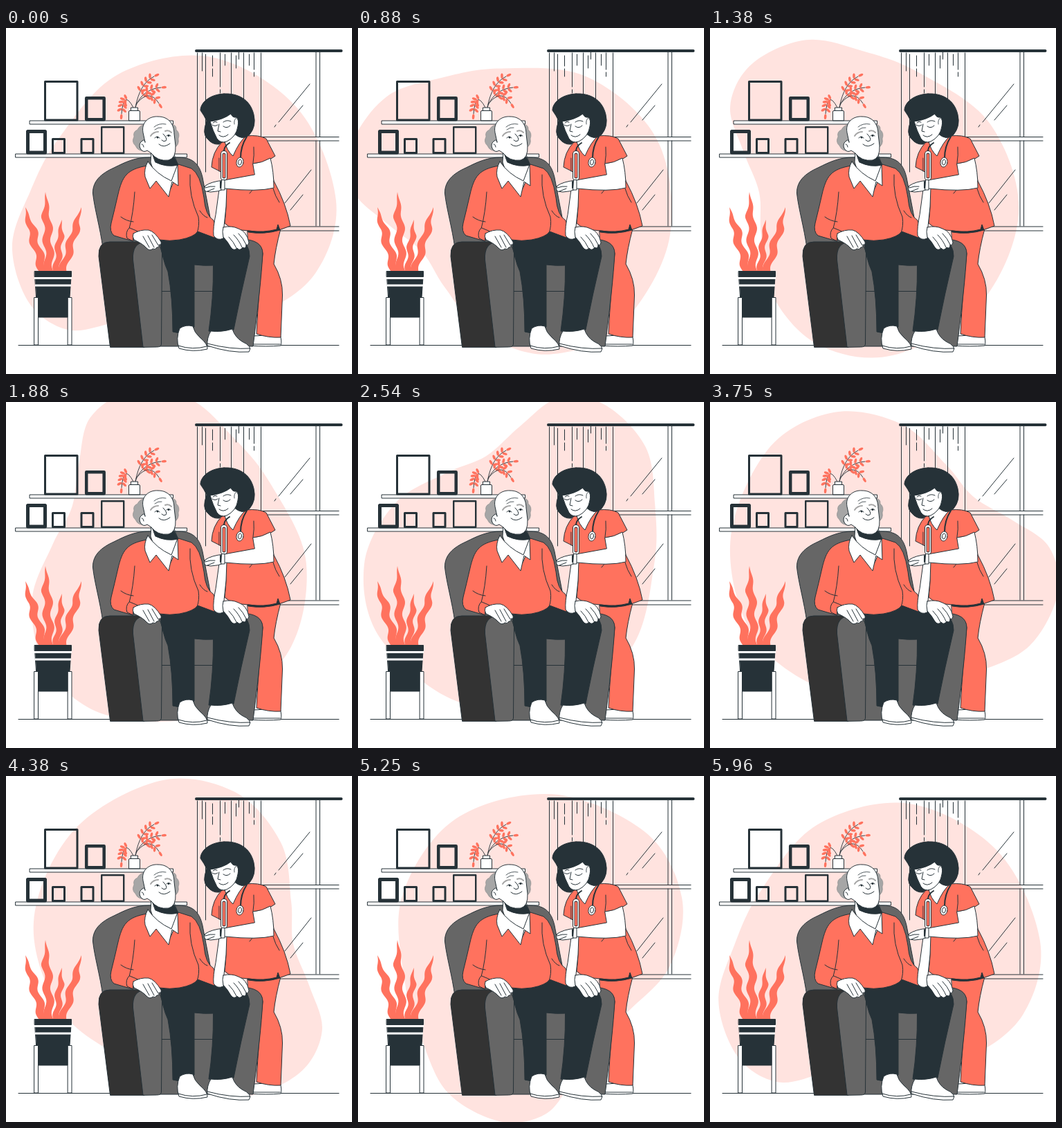
These frames come from a looping animation (500x500 px, 6000 ms). An HTML page with a canvas:

```html
<!DOCTYPE html>
<html lang="en">
<head>
<meta charset="utf-8">
<title>Home care</title>
<style>
html, body { margin: 0; width: 100%; height: 100%; overflow: hidden; background: #fff; }
canvas { display: block; width: 100vw; height: 100vh; }
</style>
</head>
<body>
<canvas id="stage" width="500" height="500"></canvas>
<script>
const INK = '#263238', CORAL = '#ff725e', PALE = '#ffe3df', GRAY = '#666', SIDE = '#333', HAIR = '#a6a6a6';
const LOOP = 6000, TURN = Math.PI * 2;

const stage = document.getElementById('stage').getContext('2d');
const scene = document.createElement('canvas');
scene.width = scene.height = 500;
const g = scene.getContext('2d');
g.lineCap = g.lineJoin = 'round';

function shape(d, fill, stroke = INK, width = 1) {
  const p = new Path2D(d);
  if (fill) { g.fillStyle = fill; g.fill(p); }
  if (stroke) { g.strokeStyle = stroke; g.lineWidth = width; g.stroke(p); }
}
const line = (d, width = 1, color = INK) => shape(d, null, color, width);

function box(x, y, w, h, fill = '#fff', width = 1) {
  shape(`M${x},${y}h${w}v${h}h${-w}z`, fill, INK, width);
}

function oval(x, y, rx, ry, turn, fill, stroke) {
  g.beginPath();
  g.ellipse(x, y, rx, ry, turn, 0, TURN);
  if (fill) { g.fillStyle = fill; g.fill(); }
  if (stroke) { g.strokeStyle = stroke; g.lineWidth = 1; g.stroke(); }
}

function drawWindow() {
  line('M276.5,36V200M288.5,38V208M309.5,36V85M309.5,89V94M325.5,36V98M343.5,36V104M368.5,36V157');
  line('M283.5,36V62M298.5,40V55M298.5,59V70M316.5,38V54M332.5,40V58M336.5,33V45M351.5,38V54M358.5,36V60M358.5,64V70');
  for (const x of [448, 453.5]) line(`M${x},35V157.5M${x},163V286`);
  for (const y of [157.5, 163]) line(`M369,${y}H481`);
  for (const y of [287, 293]) line(`M394,${y}H481`);
  line('M439,81L394,136M390,140L388,143M429,112L411,133M441,205L403,253M429,241L411,263');
  line('M275,33H484.5', 4);
}

// Stem with paired leaves along its outer part
function sprig(x0, y0, x1, y1, x2, y2, n) {
  line(`M${x0},${y0}Q${x1},${y1} ${x2},${y2}`, 0.9);
  const mix = (a, b, u) => a + (b - a) * u;
  for (let i = 0; i < n; i++) {
    const u = 0.4 + 0.6 * i / (n - 1);
    const ax = mix(x0, x1, u), ay = mix(y0, y1, u), bx = mix(x1, x2, u), by = mix(y1, y2, u);
    const x = mix(ax, bx, u), y = mix(ay, by, u), dir = Math.atan2(by - ay, bx - ax);
    for (const side of i === n - 1 ? [0] : [-1, 1]) {
      const a = dir + side * 0.95;
      oval(x + Math.cos(a) * 4.3, y + Math.sin(a) * 4.3, 3.7, 1.8, a, CORAL);
    }
  }
}

function drawShelves() {
  box(34.5, 134, 207, 5);
  box(14, 182, 247.5, 5);
  box(56.5, 77.5, 46.5, 55.5, null, 3);
  box(116.2, 101.2, 25.5, 31, null, 4.5);
  box(31.5, 149.5, 25, 30.5, null, 5);
  for (const x of [67.5, 109]) box(x, 160.5, 17, 20, null, 3);
  box(138.2, 143.2, 32, 37.6, null, 2.4);
  sprig(187, 115, 193, 80, 214, 70, 5);
  sprig(187, 114, 197, 88, 224, 86, 5);
  sprig(188, 110, 207, 86, 221, 109, 4);
  sprig(184, 115, 170, 88, 167, 124, 6);
  shape('M180.5,119.5V115H190.5V119.5', '#fff');
  shape('M177.5,133.5V121Q177.5,119.5 179,119.5H192Q193.5,119.5 193.5,121V133.5Z', '#fff');
}

function frond(x0, x1, y1, width, waves) {
  const left = [], right = [], y0 = 352;
  for (let i = 0; i <= 40; i++) {
    const u = i / 40, taper = Math.min(1, (1 - u) * 3.2);
    const x = x0 + (x1 - x0) * u - Math.sin(u * waves * TURN) * width * 0.22 * taper;
    const y = y0 + (y1 - y0) * u, half = width / 2 * taper;
    left.push(`${x - half},${y}`);
    right.unshift(`${x + half},${y}`);
  }
  shape('M' + left.concat(right).join('L') + 'Z', CORAL, null);
}

function drawPlant() {
  frond(54, 28, 259, 12, 2.8);
  frond(63, 57, 237, 11.5, 3.2);
  frond(73, 80.5, 277, 9, 2.6);
  frond(82, 109, 259, 11, 2.8);
  for (const x of [41, 89.5]) box(x, 389.5, 5.5, 68.5);
  shape('M42,360H94L92,389H89V418H47V389H44Z', INK);
  box(41.5, 351.5, 53, 8, INK);
  shape('M41,360H95V363H41Z', '#fff', null);
  shape('M42,370.5H94V373.5H42Z', '#fff', null);
}

function drawChair() {
  shape('M140,318C136,288 128,262 125.5,239C125,221 138,210 156,202C174,193 187,187 207,187H250C271,187 280,198 284,216L302,310Z', GRAY);
  shape('M207,305H340Q371,306 371,326Q368,375 357,460H222Z', GRAY);
  line('M225,380.5H300');
  shape('M150.5,461L134,330Q133,309 150,309H200V461Z', SIDE);
  shape('M198,461L183.5,335Q182,310 202,309Q224,309 225.5,325L224.5,457Q224,461 218,461Z', GRAY);
}

function drawNurseLegs() {
  shape('M358,445L396,443Q399,453 397,459Q376,461 353,459Z', '#fff');
  line('M356,457H396');
  shape('M349,290H397Q389,320 387,341Q400,363 399.5,386L397,447Q379,448 362,442Q365,380 371,326Q371,312 350,309Z', CORAL);
}

function drawManBody() {
  shape('M222,306Q250,303 280,295L302,296L338,306Q352,312 352,330Q339,385 329,436Q317,442 293,438Q300,390 299.5,343Q287,344 272,342L272,432Q262,445 241,439Q241,390 234,352Q226,335 222,306Z', INK);
  shape('M251,434Q245,449 250,463Q270,469 291,464Q292,457 280,447Q272,440 270,431Q260,428 251,434Z', '#fff');
  line('M249,459Q270,466 290,460');
  shape('M296,438Q290,448 291,459Q324,470 351,468Q357,460 341,453Q331,447 327,435Q311,440 296,438Z', '#fff');
  line('M291,456Q325,465 353,463');
  shape('M204,199C174,204 168,215 162,240Q157,262 152,282Q149,294 156,300L183,308L189,296Q223,311 251,306Q272,302 277,294L301,303Q305,290 300,278Q288,271 286,245Q281,211 268,203L246,196Z', CORAL);
  line('M186,237Q184,268 178,290M166,273Q174,279 184,280M266,212Q264,243 278,273Q280,286 276,296M280,264Q285,272 291,274');
  shape('M178,289Q172,295 175,304L184,308Q181,301 190,294Z', CORAL);
  shape('M184,297Q194,291 206,292Q215,294 224,309Q225,314 221,313Q222,317 218,317Q216,321 212,319Q208,323 203,318Q198,312 185,306Q182,301 184,297Z', '#fff');
  line('M198,301L207,317M205,300L214,317M211,299L220,314');
}

function drawManHead() {
  shape('M210,176L209,194Q216,220 235,238Q246,218 248,197L242,180Z', '#fff');
  shape('M212,183Q227,194 243,186L249,198Q232,202 216,194Z', INK);
  shape('M205,193Q199,204 201,215L208,232L217,221L235,244L240,222L249,228L248,197L239,221Q217,211 205,193Z', '#fff');
  shape('M203,139Q193,140 190,147Q183,150 185,157Q181,165 187,170Q190,178 201,178L207,158Z', HAIR, '#888', 0.6);
  shape('M239,139Q247,140 246,147Q252,152 249,160Q251,169 243,173Z', HAIR, '#888', 0.6);
  shape('M198,151C195,136 207,127 220,128C235,128 243,139 243,153L245,170Q246,188 235,191Q219,193 210,181L204,177Q198,181 194,174Q191,167 197,163Q200,160 201,165Z', '#fff');
  line('M214,143Q221,137 231,139M215,147Q220,143 225,144', 0.8);
  line('M209,156Q213,150 220,150M230,149Q235,147 239,151', 2, HAIR);
  line('M227,153Q234,160 231,163Q228,165 225,162M221,168Q228,174 237,167M215,159Q218,155 222,159M232,156Q235,153 238,156M196,168Q198,167 199,172');
  oval(219, 158, 1.4, 1.6, 0, INK);
  oval(235, 155.5, 1.4, 1.6, 0, INK);
}

function drawNurse() {
  shape('M312,165Q298,179 297,201L309,207L317,215Q320,250 316,282Q325,292 351,293Q382,299 411,286Q405,254 387,221L381,190L389,185L376,160Q366,154 346,156Q333,166 312,165Z', CORAL);
  line('M381,190Q370,196 357,196M358,172Q359,184 357,195M357,233L352,239M308,207V188M386,232Q389,243 395,252');
  shape('M350,293Q373,296 391,291L393,284L396,292Q372,299 350,295Z', INK);
  shape('M325,155L342,139L347,156Q337,164 328,185Q319,177 316,164Z', '#fff');
  shape('M315,95C294,96 281,108 281,119Q286,126 290,134Q283,153 291,160Q298,169 308,168L329,152Q342,164 352,154Q362,142 358,125C353,103 335,94 315,95Z', INK);
  shape('M295,135Q313,133 325,124Q327,130 333,129Q337,133 335,142Q333,157 319,164Q310,167 305,160Q299,149 295,135Z', '#fff');
  line('M298,140Q302,143 306,140M314,142Q319,146 324,141M308,139L306,149L310,150M308,155Q314,160 321,154M299,137Q302,134 305,136M314,136Q319,132 325,135');
  line('M333,130Q329,132 330,139', 0.8);

  // Stethoscope
  line('M348,157Q339,171 339,188M323,166Q314,171 315,181', 2);
  line('M315,182V216', 10);
  line('M315,182V216', 8, '#fff');
  line('M315,183V215', 5);
  line('M315,183V215', 3.2, CORAL);
  oval(338, 194, 5, 7, 0.2, '#fff', INK);
  oval(338, 194, 2.5, 4, 0.2, '#fff', INK);

  // Arms and joined hands
  shape('M309,229L319,231Q319,257 315,287L314,304Q305,308 300,300Q299,288 303,270Z', '#fff');
  shape('M357,196Q370,195 382,188Q387,207 387,231Q364,237 317,232Q306,237 296,237L288,236Q285,232 288,228Q296,222 315,220L359,212Z', '#fff');
  line('M288,231Q295,228 302,229M291,236L301,232');
  shape('M312,219.5H316V234H311Z', '#fff');
  line('M310,222V231', 2);
  shape('M314,288Q326,285 336,290Q348,294 351,310Q350,315 347,313Q347,320 342,317Q338,323 334,318Q329,323 325,317Q320,308 314,302Q312,294 314,288Z', '#fff');
  line('M322,302Q329,309 333,318M329,299Q337,307 341,317M336,297Q343,304 347,313');
}

line('M18,458.5H481');
drawWindow();
drawShelves();
drawPlant();
drawNurseLegs();
drawChair();
drawManBody();
drawManHead();
drawNurse();

// Closed smooth curve through polar points [degrees, radius]
function smooth(polar) {
  const pts = polar.map(([deg, r]) => [r * Math.cos(deg * TURN / 360), r * Math.sin(deg * TURN / 360)]);
  const path = new Path2D(), n = pts.length;
  path.moveTo(...pts[0]);
  pts.forEach((a, i) => {
    const p = pts[(i + n - 1) % n], b = pts[(i + 1) % n], q = pts[(i + 2) % n];
    path.bezierCurveTo(a[0] + (b[0] - p[0]) / 6, a[1] + (b[1] - p[1]) / 6,
      b[0] - (q[0] - a[0]) / 6, b[1] - (q[1] - a[1]) / 6, b[0], b[1]);
  });
  return path;
}

const blob = smooth([[2, 234], [29, 234], [54, 211], [78, 179], [98, 172], [115, 205], [128, 249],
  [143, 262], [162, 246], [181, 208], [206, 185], [245, 191], [285, 205], [325, 217]]);

function frame() {
  stage.fillStyle = '#fff';
  stage.fillRect(0, 0, 500, 500);
  stage.save();
  stage.translate(243, 240);
  stage.rotate(performance.now() % LOOP / LOOP * TURN);
  stage.fillStyle = PALE;
  stage.fill(blob);
  stage.restore();
  stage.drawImage(scene, 0, 0);
  requestAnimationFrame(frame);
}
frame();
</script>
</body>
</html>
```
